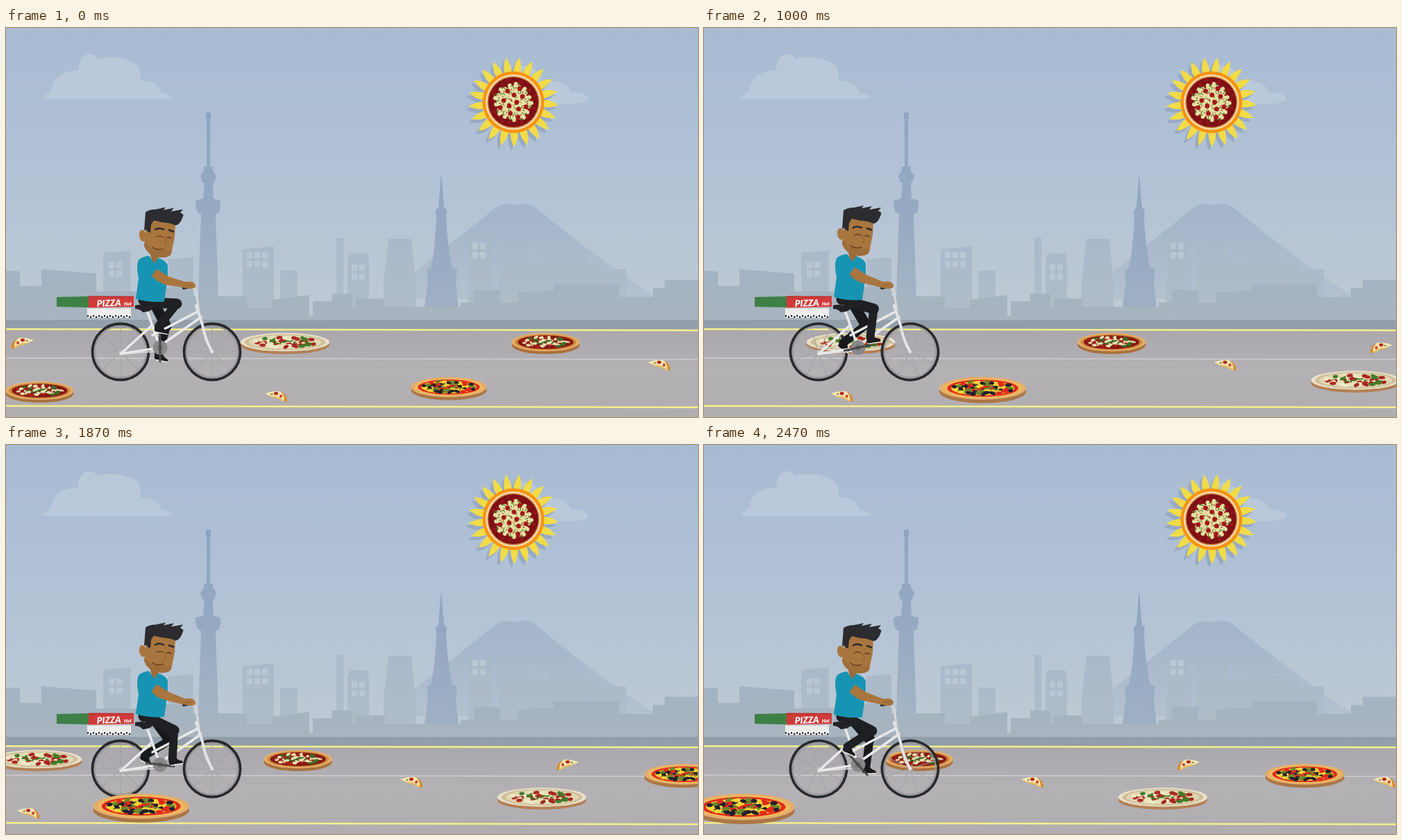
An HTML page with a canvas that plays this animation: 997 px wide and 561 px high, repeating every 2540 ms.

```html
<!DOCTYPE html>
<html lang="en">
<head>
<meta charset="utf-8">
<title>Pizza ride</title>
<style>
html, body { margin: 0; width: 100%; height: 100%; overflow: hidden; }
canvas { display: block; }
</style>
</head>
<body>
<canvas id="stage" width="997" height="561"></canvas>
<script>
const ctx = document.getElementById('stage').getContext('2d');
const LOOP = 2540, TAU = Math.PI * 2, SPEED = 7.93, PEDAL_STEPS = 20;
const CRANK = { x: 222, y: 461, r: 20 };

const fill = (color, d) => { ctx.fillStyle = color; ctx.fill(new Path2D(d)); };
const stroke = (color, width, d) => {
  ctx.strokeStyle = color;
  ctx.lineWidth = width;
  ctx.stroke(new Path2D(d));
};
const rect = (color, x, y, w, h) => { ctx.fillStyle = color; ctx.fillRect(x, y, w, h); };
const oval = (color, x, y, rx, ry = rx, turn = 0) => {
  ctx.fillStyle = color;
  ctx.beginPath();
  ctx.ellipse(x, y, rx, ry, turn, 0, TAU);
  ctx.fill();
};
const arc = (color, width, x, y, r, from = 0, to = TAU) => {
  ctx.strokeStyle = color;
  ctx.lineWidth = width;
  ctx.beginPath();
  ctx.arc(x, y, r, from, to);
  ctx.stroke();
};
const at = (x, y, draw, turn = 0) => {
  ctx.save();
  ctx.translate(x, y);
  ctx.rotate(turn);
  draw();
  ctx.restore();
};
const gradient = (y0, y1, ...colors) => {
  const g = ctx.createLinearGradient(0, y0, 0, y1);
  colors.forEach((c, i) => g.addColorStop(i / (colors.length - 1), c));
  return g;
};
const random = seed => () => (seed = seed * 16807 % 2147483647) / 2147483647;

// Spreads points evenly over the unit disc
function scatter(count, draw) {
  for (let i = 0; i < count; i++) {
    const a = i * 2.4, r = Math.sqrt((i + .5) / count);
    draw(r * Math.cos(a), r * Math.sin(a), a);
  }
}

function windows(x, y, cols) {
  for (let i = 0; i < cols * 2; i++)
    rect('#b9c6d3', x + i % cols * 11, y + (i / cols | 0) * 13, 8, 9);
}

function scenery() {
  rect(gradient(0, 421, '#a8bbd3', '#b1c2d6', '#bfcad3'), 0, 0, 997, 421);
  fill('#b9c9da', 'M53 102C54 96 66 94 67 83C69 70 88 60 104 62C104 48 110 38 119 38Q128 37 131 45C150 38 172 43 186 51Q195 57 194 76C211 75 223 84 224 94Q238 94 239 102Z');
  fill('#b9c9da', 'M735 56C750 50 768 57 771 77C792 73 810 79 813 92Q838 94 839 102C837 111 800 112 758 106Z');
  fill(gradient(253, 400, '#a3b4cb', '#b4c2cf'), 'M540 391L692 270Q706 257 717 254L735 255L749 253L760 257Q850 331 940 391Z');
  fill(gradient(300, 421, '#a9b9ca', '#b1bdc8'), `M140 421V324L180 321V421ZM234 421V333L270 331V421ZM341 421V319L386 315V421ZM395 421V350H420V421Z
    M476 421V303H486V421ZM492 421V335L495 325H521L523 335V421ZM544 421V365L551 304H584L590 365V421ZM666 421V305L701 303V421Z
    M709 421V315L754 311V338H782V332L838 334V340H858V348H893V421Z`);
  windows(148, 337, 2);
  windows(347, 323, 3);
  windows(672, 310, 2);
  windows(498, 341, 2);
  fill(gradient(122, 400, '#8fa4c2', '#96a9c2', '#a6b5c5'), 'M288 122H295V131H294V200H298V206L303 213L300 223H298L299 246L309 249V256L307 266L302 268L307 421H276L281 268L276 266L273 256V249L284 246L286 223H283L280 213L285 206V200H289V131H288Z');
  fill(gradient(215, 410, '#90a5c2', '#9fb0c4'), 'M626.5 214H627.5L629 235L631 259L635 263L634 275Q637 320 643 346L650 348L648 367L654 421H600L608 367L606 348L612 346Q618 320 620 275L619 263L623 259L625 235Z');
  fill(gradient(348, 421, '#a3b3c3', '#a8b4be'), 'M0 421V350L20 351V372H51V348L130 354V380H190V374H270V387H347V403H383V392L437 385V415H442V394H470V383H499V403H504V390H545V402H655V396H674V378H712V396H738V381L789 379V370H883V388H932V375H949V363H997V421Z');
  rect('#929eaa', 0, 421, 997, 15);
  fill(gradient(434, 561, '#aaa8ac', '#b4b1b5', '#b0adb1'), 'M0 434L997 436V561H0Z');
  stroke('#cfcdd0', 1.6, 'M0 476L997 478');
  stroke('#f6ef8b', 2.4, 'M0 434.3L997 436M0 545L997 547');
}

function rays(color) {
  for (let i = 0; i < 21; i++)
    at(0, 0, () => fill(color, 'M-4 -40Q-8 -50 1 -65Q7 -52 5 -40Z'), .12 + i * TAU / 21);
}

function sun() {
  at(727, 112, () => rays('#98a9c3'));
  at(731, 107, () => {
    rays('#f0dc49');
    oval('#f8940f', 0, 0, 44.5);
    oval('#f3dcb0', 0, 0, 40);
    oval('#c9803f', 0, 0, 37.5);
    oval('#7d1016', 0, 0, 36);
    scatter(50, (x, y) => oval('#931619', x * 33, y * 33, 2.6));
    scatter(60, (x, y, a) => oval('#e4e1a2', x * 26, y * 26, 4, 3, a));
    scatter(26, (x, y, a) => arc('#5d8233', 1.3, x * 26, y * 26, 3.5, a, a + 2));
    scatter(12, (x, y) => oval('#a5181c', x * 23, y * 23, 3.4));
  });
}

// Layers run from the rim inwards
const PIZZAS = {
  white: { base: '#b48155', layers: ['#eae1cb', '#cfbf98', '#dfd6b2'], toppings: ['#efe9c8', '#ad2b21', '#437b28', '#a8271f', '#e6dfba'] },
  tomato: { base: '#a9713e', layers: ['#e6af68', '#cf8840', '#861813'], toppings: ['#a82319', '#e6deb2', '#3d6c25', '#861813', '#e6deb2'] },
  olive: { base: '#ab7747', layers: ['#e2ae6e', '#efb85d', '#e02a1b', '#f6d339'], toppings: ['#22212c', '#f6d339', '#e02a1b', '#22212c', '#6c852c'] }
};

function pizza(kind, x, y, rx, ry) {
  if (x < -rx || x > 997 + rx) return;
  const { base, layers, toppings } = PIZZAS[kind], rnd = random(4242), size = rx / 55;
  at(x, y, () => {
    oval(base, 0, ry * .14, rx, ry * .88);
    layers.forEach((color, i) => oval(color, 0, -ry * .13, rx * (1 - i * .09), ry * (.88 - i * .11)));
    scatter(64, (u, v) => {
      const color = toppings[Math.floor(rnd() * toppings.length)];
      oval(color, u * rx * .7, ry * (v * .5 - .14), (3 + rnd() * 1.6) * size, 2.1 * size, rnd() - .5);
    });
  });
}

function slice(x, y, flip = 1) {
  at(x, y, () => {
    ctx.scale(flip, 1);
    fill('#d98a2c', 'M5 -7Q16 -4 16 8L11 7L2 -4Z');
    fill('#f4e5b4', 'M-16 -4Q-5 -8 6 -7Q12 -3 12 7Q5 0 -4 0Q-10 0 -16 -4Z');
    fill('#e9bf62', 'M-16 -4Q-8 0 -4 0Q5 0 12 7L11 8Q2 2 -5 2Z');
    oval('#b8261c', 0, -4, 3, 2.3);
    oval('#c8432a', 7, 0, 2, 2.2);
    oval('#6c8a34', -6, -3, 1.8, 1);
  });
}

function wheel(x, turn) {
  at(x, 467, () => {
    stroke('#a3a2a5', 1.1, 'M-37 0H37M0 -37V37M-26 -26L26 26M-26 26L26 -26');
    arc('#292a2d', 3.8, 0, 0, 40.5);
    arc('#98989b', 1.8, 0, 0, 37);
    oval('#bdbdc0', 0, 0, 3);
  }, turn);
}

const pedal = angle => [CRANK.x + CRANK.r * Math.sin(angle), CRANK.y - CRANK.r * Math.cos(angle)];

// The knee follows from hip and ankle by the law of cosines
function leg(hipX, hipY, angle, color) {
  const thigh = 39, shin = 43, [px, py] = pedal(angle);
  const ax = px - 2, ay = py - 9, dx = ax - hipX, dy = ay - hipY;
  const reach = Math.min(Math.hypot(dx, dy), thigh + shin - .1);
  const bend = Math.acos((thigh ** 2 + reach ** 2 - shin ** 2) / (2 * thigh * reach));
  const dir = Math.atan2(dy, dx) - bend;
  const kx = hipX + thigh * Math.cos(dir), ky = hipY + thigh * Math.sin(dir);
  at(ax, ay, () => {
    fill('#f0f0f1', 'M-5 4Q-4 9 1 8L14 9Q14 5 9 4Z');
    fill('#1b1b1e', 'M-5 -4L5 -4Q7 2 13 4Q15 7 13 7.5L2 6.5Q-5 7 -6 4Z');
  }, .12 - .35 * Math.sin(angle));
  stroke(color, 15, `M${hipX} ${hipY}L${kx} ${ky}`);
  stroke(color, 12, `M${kx} ${ky}L${ax} ${ay - 2}`);
}

function cargo() {
  rect('#ececec', 117, 403, 63, 12);
  rect('#cfcfd2', 117, 403, 63, 2);
  rect('#f4f4f4', 117, 413, 63, 5);
  for (let i = 0; i < 16; i++) rect('#27272a', 117 + i * 4, 414 + i % 2 * 1.5, 2.2, 2.5);
  fill('#3f8046', 'M73 388L119 387V403L73 402Z');
  fill('#d13a38', 'M119 386.5L184 387V402L119 403.5Z');
  stroke('#b92f30', 1.5, 'M120 387.5H183');
  at(131, 402, () => {
    ctx.fillStyle = '#fff';
    ctx.font = 'italic 900 13px Lato, sans-serif';
    ctx.fillText('PIZZA', 0, 0);
    ctx.font = 'italic 900 7px Lato, sans-serif';
    ctx.fillText('Hot', 39, 0);
  }, -.04);
}

function bikeFrame() {
  stroke('#d5d5d8', 2, 'M165 470L222 466');
  stroke('#e9e9eb', 3.6, 'M165 470L209 430M165 470L222 461M204 410L222 461M221 459L281 417M211 443L276 409');
  stroke('#e4e4e7', 4, 'M274 400L283 428Q287 450 297 467');
  stroke('#d8d8db', 3, 'M278 408L274 382Q273 375 264 373L256 375');
  stroke('#2b2b2e', 4, 'M256 375L265 373');
}

function upperBody(lift) {
  at(0, lift, () => {
    fill('#9c6a38', 'M207 322H220L219 341L211 341Z');
    fill('#1794b3', 'M191 335Q196 330 206 329L214 340L219 332Q231 336 233 343L233 360L228 395Q207 397 187 391L191 362Q187 344 191 335Z');
  });
  fill('#a9753f', `M214 ${346 + lift}L234 ${359 + lift}L258 366Q271 364 273 371Q274 376 265 376L254 374L230 ${371 + lift}Q217 366 208 ${356 + lift}Z`);
  stroke('#8f5f2f', 1, 'M259 371L268 371');
  at(0, lift, () => {
    fill('#1794b3', 'M196 336Q210 334 218 347L208 360L196 350Z');
    oval('#a9753f', 197, 300, 5, 8.5, -.15);
    fill('#a9753f', 'M203 278Q225 273 244 282L243 302L238 326Q232 333 219 331Q205 328 199 314Z');
    fill('#9e6d3c', 'M200 309Q206 319 213 319Q226 322 239 322L237 328Q231 333 219 331Q204 328 199 315Z');
    stroke('#5d3518', 1.3, 'M211 317Q218 322 227 319');
    stroke('#94632f', 1.2, 'M229 302L231 312L227 313');
    stroke('#2b2a2c', 2.6, 'M215 291Q220 288 227 291M235 292L241 294');
    stroke('#4b3018', 1.2, 'M217 302Q221 299 226 302M232 303Q235 301 238 304');
    fill('#2c2c30', 'M199 293L201 266Q207 262 216 262L230 259L227 263L242 260L238 265L255 262L251 267Q257 269 255 272L253 277Q249 285 244 285Q235 281 226 281L213 278L209 284L208 296L204 294L202 291Z');
  });
}

function rider(step) {
  // Each pedal turn slows towards its end, then snaps over the top
  const part = step % PEDAL_STEPS / PEDAL_STEPS;
  const angle = TAU * part + .17 * Math.sin(Math.PI * part) - .6 * part ** 6;
  const lift = -.5 - 2.5 * Math.abs(Math.sin(angle)), hipY = 396 + lift / 2;
  wheel(165, step * TAU / PEDAL_STEPS);
  wheel(297, step * TAU / PEDAL_STEPS);
  leg(213, hipY, angle + Math.PI, '#18191c');
  cargo();
  bikeFrame();
  oval('#88888b', CRANK.x, CRANK.y, 10.5);
  oval('#707073', CRANK.x, CRANK.y, 4);
  stroke('#4a4a4d', 3, `M${pedal(angle + Math.PI)}L${pedal(angle)}`);
  stroke('#1f2023', 15, `M198 ${hipY - 3}H208`);
  leg(207, hipY, angle, '#1f2023');
  fill('#232326', 'M186 400Q198 397 212 402Q212 407 204 409L197 410Q193 405 186 405Z');
  upperBody(lift);
}

function draw(step) {
  const shift = step * SPEED;
  ctx.lineCap = ctx.lineJoin = 'round';
  scenery();
  sun();
  pizza('white', 402 - shift, 455, 64, 15);
  pizza('tomato', 777.5 - shift, 455, 49, 15);
  pizza('olive', 1333.5 - shift, 477, 57, 17);
  slice(24 - shift, 454, -1);
  slice(1166 - shift, 461, -1);
  slice(941 - shift, 486);
  slice(1448 - shift, 486);
  rider(step);
  pizza('white', 1129 - shift, 510, 64, 15.5);
  pizza('tomato', 48.5 - shift, 525, 49, 15);
  slice(389 - shift, 531);
  pizza('olive', 638 - step * 9.85, 520 + step * .08, 54.5 + step * .33, 16.5 + step * .09);
}

const start = performance.now();
function tick() {
  const t = (performance.now() - start) % LOOP;
  // 15 pictures a second on a 10 ms clock, sampled from a 24 per second motion
  const picture = Math.min(37, Math.floor((Math.floor(t / 10) * 10 + 4) * .015));
  draw(Math.round(picture * 1.6));
  requestAnimationFrame(tick);
}
tick();
</script>
</body>
</html>
```
